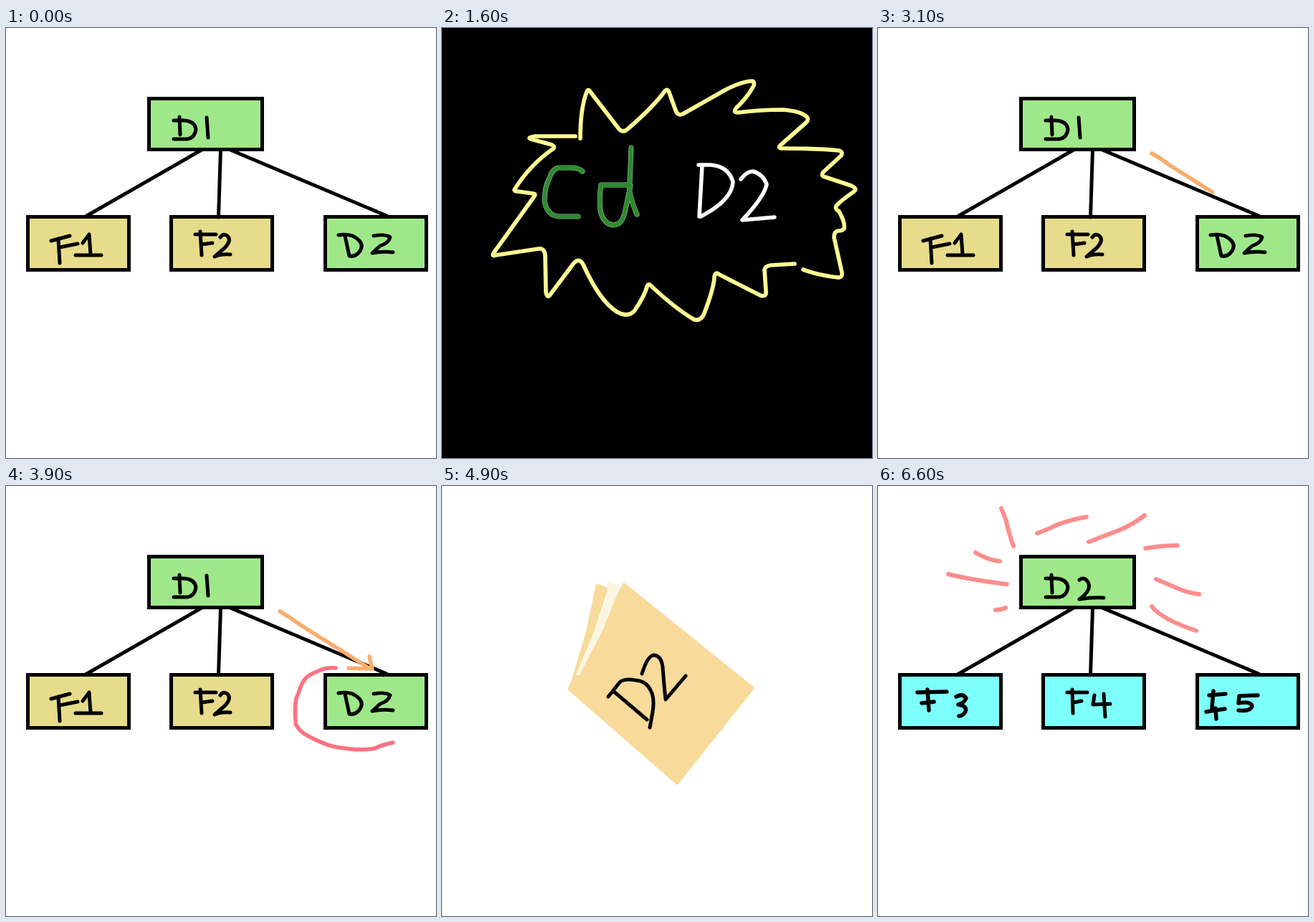
Write an HTML page that moves like this. It is 600 px wide and 600 px high and loops after 7.1 s.

```html
<!DOCTYPE html>
<html lang="en">
<head>
<meta charset="utf-8">
<title>Directory tree</title>
<style>
  html, body { margin: 0; width: 100%; height: 100%; overflow: hidden; background: #fff; }
  svg { display: block; width: 100vw; height: 100vh; }
  path { fill: none; stroke-linecap: round; stroke-linejoin: round; vector-effect: non-scaling-stroke; }
</style>
</head>
<body>
<svg id="stage" viewBox="0 0 600 600"></svg>
<script>
const LOOP = 7100;
const parts = [];
const stage = document.getElementById('stage');

// Times are flat lists of [on, off, on, off, ...] in ms.
function show(times, markup) {
  const g = document.createElementNS('http://www.w3.org/2000/svg', 'g');
  g.innerHTML = markup;
  stage.append(g);
  parts.push({ g, times });
}
const line = (d, color = '#000', width = 5) =>
  `<path d="${d}" stroke="${color}" stroke-width="${width}"/>`;
const shape = (d, color) =>
  `<path d="${d}" style="fill:${color}" stroke="${color}" stroke-width="5"/>`;
const box = (x, y, w, h, color) =>
  `<rect x="${x}" y="${y}" width="${w}" height="${h}" fill="${color}" stroke="#000" stroke-width="5"/>`;
const row = colors => colors.map((c, i) => box([30.5, 230.5, 445.5][i], 263.5, 141, 74, c)).join('');

const GREEN = '#9fe88a', TAN = '#e7dc8b', CYAN = '#7dfffc';
const ORANGE = '#f9ad6b', PINK = '#fd7180', RAY = '#ff8c8c';
const COVER = '#f8da9b', PAGE = '#fbf6e0', FLASH = '#fefb92';

// Trees
const before = [0, 1000, 2100, 4500], after = [5600, LOOP];
show([...before, ...after], box(199.5, 98.5, 158, 71, GREEN) +
  line('M234 129H248Q264 130 265 142Q263 154 252 155H234M242 124L243 149'));
show(before, row([TAN, TAN, GREEN]) +
  line('M280 125L282 153') +
  line('M63 297L74 294L89 290M73 294L75 328M75 306L100 301M107 300L116 288L118 316M97 317H133') +
  line('M264 288H293M271 284L273 317M273 302L288 300M299 292Q303 286 309 290Q315 296 306 306L291 319Q300 315 313 316') +
  line('M464 289Q481 286 490 294Q500 302 494 311Q488 320 479 318L473 290M513 290Q530 287 536 292Q534 300 522 304L511 314Q525 311 540 313'));
show(after, row([CYAN, CYAN, CYAN]) +
  line('M281 131Q288 126 293 134Q299 145 281 158Q298 155 315 156') +
  line('M55 288L96 287M69 284L71 313M61 303L78 301M109 294Q119 289 123 296Q120 303 112 305Q125 307 122 315Q118 321 113 321', '#000', 5.5) +
  line('M264 288H292M271 284L272 317M273 302L284 300M302 292L300 305L324 304M315 290L317 322') +
  line('M462 292L485 290M468 286L466 310M458 315L484 311M471 310L472 325M530 292L504 293L503 303Q520 300 522 307Q520 315 503 313', '#000', 5.5));
show([0, 1000, 2100, 2900, 3100, 3300, 3900, 4500, ...after],
  line('M273 170L111 263M299.5 170L296.5 264M313 170L531 262'));

// Arrow and ring, drawn stroke by stroke
const pen = [
  [2100, 'M382 175L394 182'],
  [2300, 'M394 182L408 192'],
  [2500, 'M408 192L422 201'],
  [2700, 'M422 201L446 216'],
  [2900, 'M446 216L457 223'],
  [3100, 'M457 223L467 229'],
  [3300, 'M467 229L478 236'],
  [3500, 'M478 236L508 255M507 238L511 255'],
  [3700, 'M478 254L504 255'],
  [3700, 'M460 254Q447 253 436 258Q420 264 416 271Q410 280 408 290Q402 297 404 328', PINK],
  [3900, 'M404 332Q410 343 420 348Q450 364 466 365Q495 370 515 366Q525 361 540 358', PINK],
  [4100, 'M540 358Q588 342 602 312Q602 270 572 252', PINK],
  [4300, 'M574 253Q520 240 458 259', PINK]
];
for (const [start, d, color = ORANGE] of pen) show([start, 4500], line(d, color, 5.5));

// Burst on black
const burst =
  line('M156 134H100Q88 136 94 138L120 145Q131 148 123 153Q93 174 72 207Q69 211 76 211L97 214Q102 214 98 219L42 297Q39 302 45 300L105 291Q113 290 114 300L115 352Q117 361 121 355L154 311Q162 303 167 313Q190 364 214 379Q230 388 239 377Q253 356 256 344Q258 338 262 343Q295 374 322 390Q332 392 336 381Q349 347 350 331Q351 322 357 327L414 356Q423 359 422 350L420 320Q421 315 429 314L462 312', FLASH, 5.7) +
  line('M163 137Q163 95 172 72Q174 67 177 72L217 124Q223 130 229 124Q265 93 281 71Q285 67 287 73L296 98Q299 106 306 103L366 69Q390 57 403 57Q408 59 403 67Q394 82 381 94Q375 101 383 101Q415 97 445 97Q470 99 478 106Q483 110 478 115L444 145Q436 151 446 151Q500 151 524 154Q530 156 527 161L502 184Q498 190 505 191L541 203Q550 207 545 211Q528 223 521 230Q517 235 524 239Q533 255 531 263Q529 266 523 266Q517 267 517 275L528 324Q529 332 522 331Q495 328 474 320', FLASH, 5.7);
const command = 'M196 200Q190 195 180 195H162Q154 197 150 209Q143 222 143 242Q147 262 163 263H190M258 219H222Q219 235 221 255Q225 274 240 275Q251 274 255 258L263 220M264 167L262 215Q259 230 272 260';
show([1000, 2100], '<rect width="600" height="600"/>' +
  line(command, '#8fc08f', 7) + line(command, '#2f8a32', 5.8) +
  line('M363 192L359 263M358 191H375Q400 193 406 215Q404 241 361 263M417 211Q425 200 434 200Q448 204 453 218Q450 235 419 268L464 264', '#fff', 5.5));
show([1000, 1200, 1400, 1600], burst);
show([1200, 1400, 1600, 2100], `<g transform="translate(30 17)">${burst}</g>`);

// Turning book
const cover = shape('M254 138L433 282L328 414L178 283Z', COVER) +
  line('M232 294L247 275Q252 268 270 271Q285 272 291 285Q297 295 294 315L290 337M240 287L286 326M279 262Q287 236 296 236Q306 237 308 253Q310 280 312 298L340 265');
const ajar = shape('M217 139L229 144L190 262L180 282L203 205Z', COVER) +
  shape('M234 136L246 141L222 200L190 262L214 205L232 158Z', PAGE);
const turn = (angle, squash = 1) =>
  `rotate(${angle} 306 278) translate(306 278) rotate(39) scale(1 ${squash}) rotate(-39) translate(-306 -278)`;
const poses = [
  [4500, 4700, 51], [4700, 4800, 34], [4800, 4900, 17],
  [4900, 5000, 0], [5000, 5100, -20], [5100, 5200, -39, .5]
];
for (const [on, off, angle, squash] of poses)
  show([on, off], `<g transform="${turn(angle, squash)}">${cover}${angle > 0 ? '' : ajar}</g>`);

const open =
  line('M125 261Q165 263 196 274Q210 279 275 326L293 357L325 309Q335 298 369 272Q390 260 405 255L455 242L474 240', COVER, 10) +
  line('M183 239Q230 259 250 272Q270 290 279 307M158 247Q200 265 246 280Q280 310 295 339M238 291L240 297M355 235L330 252Q315 262 300 308M424 213L380 234Q340 250 320 278Q305 300 298 316M406 239Q345 265 330 290L315 320', PAGE, 8);
for (const [on, off, sx, sy] of [[5200, 5300, .3, 1.6], [5300, 5400, .65, 1.3], [5400, 5600, 1, 1]])
  show([on, off], `<g transform="translate(293 357) scale(${sx} ${sy}) translate(-293 -357)">${open}</g>`);

// Flashing rays
show([5800, 6000, 6200, 6600],
  line('M142 166L180 150M150 106L184 119M177 62L196 88M240 42L248 82M310 42L302 82M388 53L352 84M422 98L380 116M422 165L384 150', RAY, 6));
show([6000, 6200, 6600, LOOP],
  line('M172 31L179 49Q182 64 189 84M222 66L240 59Q255 50 291 43M294 78L338 61Q355 54 372 41M373 87Q395 83 418 83M136 93Q155 104 170 105M98 123Q130 131 180 137M164 173Q172 173 178 170M388 130L416 142Q435 150 448 151M382 168Q396 186 444 202', RAY, 6));

const origin = performance.now();
function tick() {
  const t = (performance.now() - origin) % LOOP;
  for (const { g, times } of parts) {
    const on = times.some((start, i) => i % 2 === 0 && t >= start && t < times[i + 1]);
    g.style.display = on ? '' : 'none';
  }
  requestAnimationFrame(tick);
}
tick();
</script>
</body>
</html>
```
